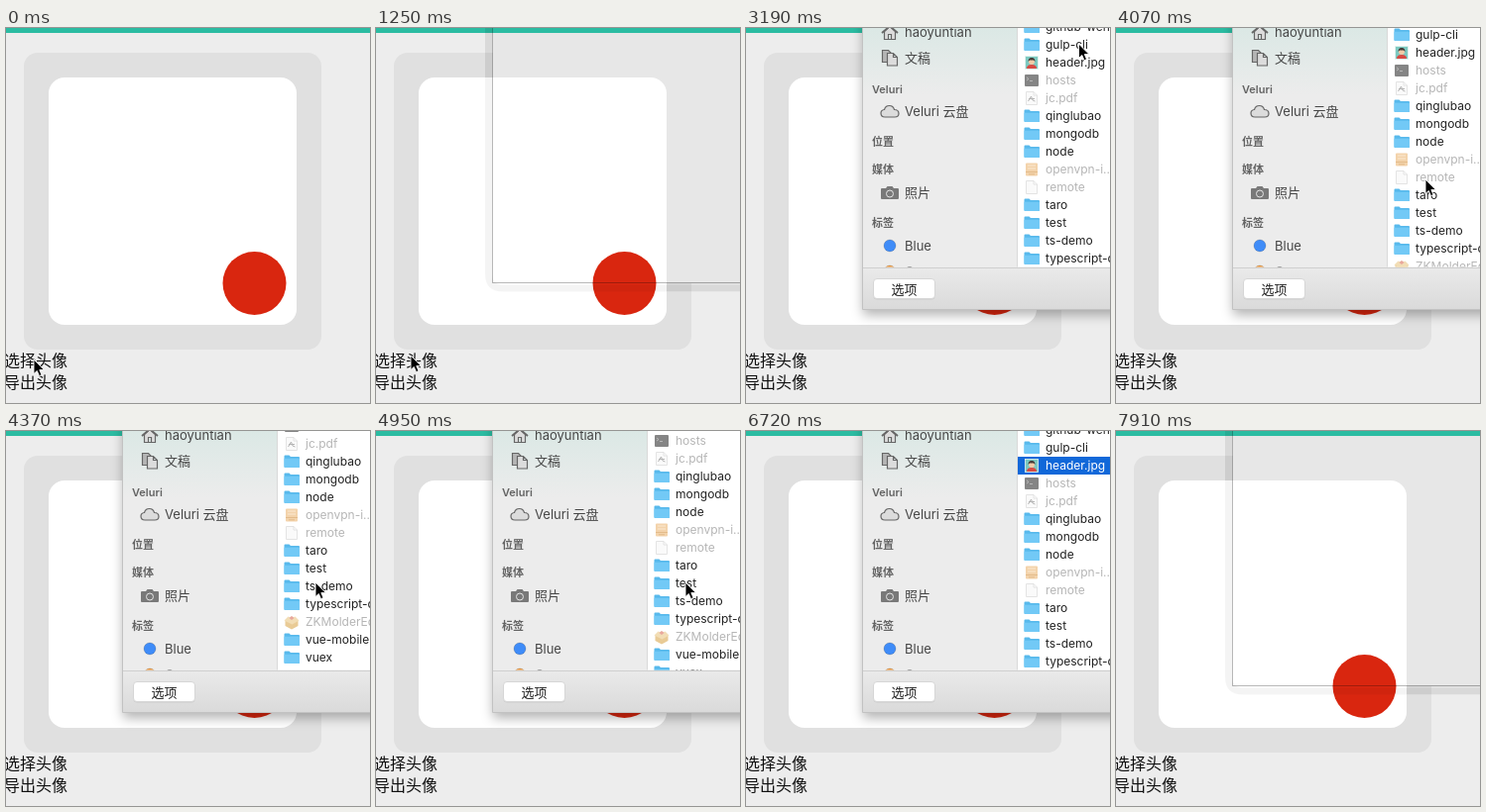
Animation of 367x379 px, one loop 8 s. Source, as an HTML page:

```html
<!DOCTYPE html>
<html lang="zh">
<head>
<meta charset="utf-8">
<style>
  html, body { margin: 0; width: 100%; height: 100%; overflow: hidden; background: #ededed; }
  svg { display: block; font-family: Inter, "Noto Sans CJK SC", "Noto Sans CJK", sans-serif; }
</style>
</head>
<body>
<svg id="stage" width="367" height="379" viewBox="0 0 367 379">
  <defs>
    <linearGradient id="tint" x1="0" y1="0" x2="0" y2="1">
      <stop offset="0" stop-color="#dbe8e5"/><stop offset=".28" stop-color="#ececec"/>
    </linearGradient>
    <linearGradient id="barTint" x1="0" y1="0" x2="0" y2="1">
      <stop offset="0" stop-color="#eaeaea"/><stop offset="1" stop-color="#dadada"/>
    </linearGradient>
    <filter id="shadow" x="-10%" y="-10%" width="120%" height="125%">
      <feDropShadow dx="0" dy="6" stdDeviation="6" flood-opacity=".3"/>
    </filter>
    <clipPath id="bodyClip"><rect x="118" width="249" height="241.500"/></clipPath>
    <g id="folder">
      <path d="M.5-5.500q0-1 1-1h4l1.500 1.500h8q1 0 1 1V5q0 1-1 1h-13.500q-1 0-1-1z" fill="#58b9ec"/>
      <path d="M.5-3.200h15.500V5q0 1-1 1h-13.500q-1 0-1-1z" fill="#72c9f6"/>
    </g>
    <path id="doc" d="M2.500-6.500h7.500l3.500 3.500v9.500h-11zM10-6.500v3.500h3.500" fill="#fafafa" stroke="#dedede" stroke-width=".8"/>
    <g id="pdf">
      <use href="#doc"/><path d="M4.500 3l3-5 1.500 4 2.500 1M5 .5h6" fill="none" stroke="#b5b5b5"/>
    </g>
    <g id="photo">
      <rect x="1.500" y="-6.500" width="13" height="13" fill="#7cc9c0" stroke="#e8f3f1" stroke-width=".8"/>
      <path d="M3 6q0-4 5-4t5 4z" fill="#d84a43"/><circle cx="8" cy="-1" r="3" fill="#f3cba8"/>
      <path d="M4.500-1q0-4 3.500-4t3.500 4l-1.500-1.500h-4z" fill="#443936"/>
    </g>
    <g id="terminal">
      <rect x="1" y="-6" width="14" height="12" rx="1" fill="#858585"/>
      <path d="M3-3l2 1.500-2 1.500M6 .5h3" fill="none" stroke="#c5c5c5" stroke-width=".8"/>
    </g>
    <g id="archive">
      <rect x="2" y="-6.500" width="12" height="13" rx="1" fill="#f3d3ab"/>
      <path d="M4-4h8M4-1h8" stroke="#fbe9d2"/><path d="M2 2.500h12M5 4.800h6" stroke="#e3bb8a"/>
    </g>
    <g id="package">
      <path d="M1.500-1l6.500-4.500 6.500 4.500v5l-6.500 3.500-6.500-3.500z" fill="#e9cb96"/>
      <path d="M.5-1.500l4-4 3.500 2 3.500-2 4 4-7 4z" fill="#f2ddb5"/><path d="M5.500-4l2.500-2 2.500 2-2.500 2z" fill="#e9a79c"/>
    </g>
  </defs>

  <rect width="367" height="379" fill="#ededed"/>
  <rect width="367" height="5" fill="#2bbca2"/>
  <rect x="18" y="25" width="300" height="300" rx="14" fill="#e0e0e0"/>
  <g id="ghostPanel">
    <rect x="118" y="5" width="249" height="253" fill="#e7e7e7"/>
    <path d="M110 0h7v257h250v9H132q-18 0-22-16z" fill="#000" opacity=".045"/>
  </g>
  <rect x="43" y="50" width="250" height="250" rx="16" fill="#fff"/>
  <circle cx="250.500" cy="258" r="32" fill="#d9260f"/>
  <g id="ghostEdge" fill="none" stroke="#000">
    <path d="M113.500 0v249q0 14 15 14h239" stroke-width="7" opacity=".045"/>
    <path d="M117.500 0v257.500H367" opacity=".28"/>
  </g>
  <g font-size="16" font-weight="300" fill="#111"><text x="-2" y="342">选择头像</text><text x="-2" y="364">导出头像</text></g>

  <g id="dialog">
    <rect id="frame" x="118" y="-40" width="290" height="324" filter="url(#shadow)"/>
    <rect id="toolbar" x="118" y="242" width="249" height="42"/>
    <g clip-path="url(#bodyClip)">
      <rect id="sidebar" x="118" width="156" height="242"/>
      <rect x="274" width="93" height="242" fill="#fff"/>
      <path d="M273.500 0v242" stroke="#d9d9d9"/>
      <g id="places"></g>
      <g id="list" font-size="12"></g>
    </g>
    <path d="M118 242.500h249" stroke="#cfcfcf"/>
    <path d="M117.500 0v284.500H367" fill="none" stroke="#c2c2c2"/>
    <rect x="128.500" y="254.500" width="62" height="20" rx="3.500" fill="#ccc"/>
    <rect x="128.500" y="253.500" width="62" height="20" rx="3.500" fill="#fff" stroke="#d6d6d6"/>
    <text x="159.500" y="268.500" font-size="13" text-anchor="middle" fill="#222">选项</text>
  </g>
  <path id="cursor" d="M0 0V14.500L3.300 11.500 5.500 16.700 8 15.600 5.800 10.600H10.500Z" fill="#000" stroke="#fff" stroke-width=".9"/>
</svg>
<script>
const LOOP = 8000, ROW = 18, SELECTED = 2;
const $ = id => document.getElementById(id);

const files = [
  ['folder', 'github-wen...'], ['folder', 'gulp-cli'], ['photo', 'header.jpg'],
  ['terminal', 'hosts'], ['pdf', 'jc.pdf'], ['folder', 'qinglubao'],
  ['folder', 'mongodb'], ['folder', 'node'], ['archive', 'openvpn-i...'],
  ['doc', 'remote'], ['folder', 'taro'], ['folder', 'test'],
  ['folder', 'ts-demo'], ['folder', 'typescript-demo'], ['package', 'ZKMolderEd...'],
  ['folder', 'vue-mobile'], ['folder', 'vuex']
];
const enabled = kind => kind === 'folder' || kind === 'photo';

$('list').innerHTML = `<rect id="highlight" x="274" y="26" width="93" height="18" fill="#1168d9"/>` +
  files.map(([kind, name], i) => {
    const y = i * ROW - 1;
    return `<use href="#${kind}" x="280" y="${y}"/>
      <text id="file${i}" x="302" y="${y + 4}" fill="${enabled(kind) ? '#222' : '#b6b6b6'}">${name}</text>`;
  }).join('');

const heading = (label, y, x = 127) =>
  `<text x="${x}" y="${y}" font-size="11" font-weight="600" opacity=".82">${label}</text>`;
const place = (label, y) => `<text x="160" y="${y}" font-size="13">${label}</text>`;
const tag = (color, y) => `<circle cx="145" cy="${y}" r="6" fill="${color}" stroke="#0003" stroke-width=".8"/>`;

$('places').innerHTML =
  place('haoyuntian', 9) + place('文稿', 35) + heading('Veluri', 66) +
  place('Veluri 云盘', 89) + heading('位置', 119) + heading('媒体', 147) +
  place('照片', 171) + heading('标签', 201) + place('Blue', 225) + place('Orange', 251) +
  `<g id="hideLabel">${heading('隐藏', 201, 241)}</g>` + tag('#3f8cf8', 220) + tag('#f7952d', 246) +
  `<g fill="#dcdcdc" stroke="currentColor" stroke-width="1.200">
    <path d="M139.500 3.500v8h11v-8l-5.500-5zM143.500 11.500v-5h3v5"/>
    <path d="M137 5l8-7 8 7" fill="none" stroke-width="1.800"/>
    <path d="M137.500 22.500h6l3 3v9h-9z" fill="#b5b5b5"/>
    <path d="M142.500 25.500h6l4 4v8.500h-10zM148.500 25.500v4h4"/>
    <path d="M140 90q-4 0-4-4 0-3 3.500-3.500 1-4 5-4 4 0 5 4 4.500 0 4.500 4 0 3.500-4 3.500z"/>
  </g>
  <path d="M137 162h4l1.500-2h5l1.500 2h4q1 0 1 1v9q0 1-1 1h-16q-1 0-1-1v-9q0-1 1-1z" fill="currentColor" opacity=".85"/>
  <circle cx="145" cy="167.500" r="3.500" fill="none" stroke="#e4e4e4"/>`;

// Stepped tracks: [start, ...values]
const pointer = [
  [0, 28, 335], [500, 32, 332], [650, 35, 331], [1690, 180, 160], [1840, 332, 20],
  [3190, 335.5, 16], [3340, 325, 55], [3480, 307, 120], [3630, 311, 147], [3780, 312, 153],
  [5390, 313, 140], [5540, 318, 105], [5690, 323, 69], [5830, 326, 50],
  [5980, 327, 41], [6130, 327, 39], [6270, 327, 35]
];
const scroll = [
  [0, 0], [4070, 10], [4220, 37], [4370, 58], [4510, 60], [4660, 58],
  [4950, 43], [5100, 27], [5240, 13], [5390, 5], [5540, 1], [5690, 0]
];
const at = (track, t) => track.findLast(step => step[0] <= t).slice(1);
const show = (id, on) => $(id).setAttribute('display', on ? 'inline' : 'none');
const set = (id, name, value) => $(id).setAttribute(name, value);

function render(t) {
  const ghost = t >= 7910 || (t >= 1250 && t < 1400);
  const loaded = t >= 1690, picked = t >= 6130;
  show('ghostPanel', ghost);
  show('ghostEdge', ghost);
  show('dialog', t >= 1400 && t < 7910);
  show('list', loaded);
  show('hideLabel', !loaded);
  show('highlight', picked);
  show('cursor', t < 6720);

  set('frame', 'fill', loaded ? '#ececec' : '#f5f5f5');
  set('sidebar', 'fill', loaded ? 'url(#tint)' : '#f5f5f5');
  set('toolbar', 'fill', loaded ? 'url(#barTint)' : '#f5f5f5');
  set('places', 'fill', loaded ? '#464646' : '#757575');
  set('places', 'color', loaded ? '#666' : '#808080');
  set('file' + SELECTED, 'fill', picked ? '#fff' : '#222');
  set('list', 'transform', `translate(0 ${-at(scroll, t)[0]})`);
  set('cursor', 'transform', `translate(${at(pointer, t)})`);
}

const start = performance.now();
function tick() {
  render((performance.now() - start) % LOOP);
  requestAnimationFrame(tick);
}
tick();
</script>
</body>
</html>
```
